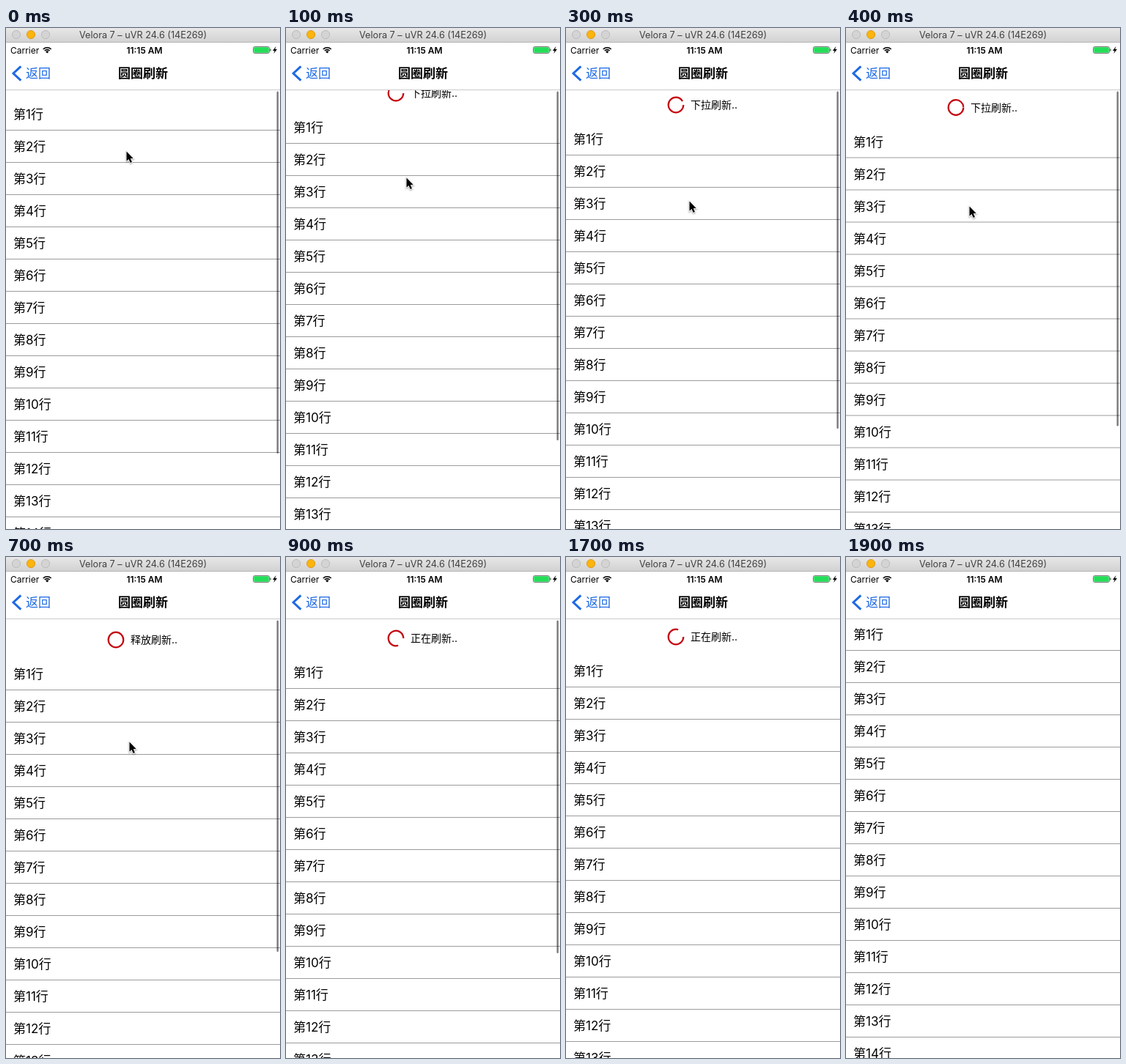
An HTML page with a canvas that plays this animation: 374x684 px, repeating every 2 s.

```html
<!DOCTYPE html>
<html lang="zh-CN">
<head>
<meta charset="utf-8">
<title>圆圈刷新</title>
<style>
  html, body { margin: 0; width: 100%; height: 100%; overflow: hidden; background: #fff; }
  canvas { display: block; }
</style>
</head>
<body>
<canvas width="374" height="684"></canvas>
<script>
const ctx = document.querySelector('canvas').getContext('2d');
const WIDTH = 374, HEIGHT = 684, LOOP = 2000, STEP = 100;
const ROW = 44, FULL_PULL = 50;
const FONT = 'Inter, "Noto Sans CJK SC", "Noto Sans CJK", sans-serif';

// Pull distance per step while dragging and settling; it then rests at FULL_PULL.
const DRAG = [12, 30, 40.5, 46, 49.5, 52, 53.5, 54, 54, 52];
const REFRESH_STEP = 9, CLOSE_STEP = 18;

function text(str, x, y, size, color = '#000', weight = 400, align = 'left') {
  ctx.font = `${weight} ${size}px ${FONT}`;
  ctx.fillStyle = color;
  ctx.textAlign = align;
  ctx.fillText(str, x, y);
}

function rect(x, y, w, h, color) {
  ctx.fillStyle = color;
  ctx.fillRect(x, y, w, h);
}

function roundRect(x, y, w, h, r) {
  ctx.beginPath();
  ctx.roundRect(x, y, w, h, r);
}

function polyline(points) {
  ctx.beginPath();
  points.forEach(([x, y]) => ctx.lineTo(x, y));
}

function stroke(color, width) {
  ctx.strokeStyle = color;
  ctx.lineWidth = width;
  ctx.stroke();
}

function fill(color) {
  ctx.fillStyle = color;
  ctx.fill();
}

function arc(x, y, r, from, to) {
  ctx.beginPath();
  ctx.arc(x, y, r, from, to);
}

function drawRows(pull) {
  for (let i = 0; i < 14; i++) {
    const top = 84 + pull + i * ROW;
    text(`第${i + 1}行`, 10, top + 28, 17);
    rect(0, top + 43, WIDTH, 1, '#9b9b9b');
  }
}

function drawRefreshHeader(pull, step) {
  const y = 59 + pull;
  const refreshing = step >= REFRESH_STEP;
  const turn = refreshing ? (step * STEP - 1700) / 1000 * 2 * Math.PI : 0;
  const part = refreshing ? 0.8 : Math.min(1, pull / FULL_PULL);
  arc(150, y, 10.3, turn, turn + part * 2 * Math.PI);
  stroke('#c4000c', 2.2);
  const label = refreshing ? '正在' : pull >= FULL_PULL ? '释放' : '下拉';
  text(label + '刷新..', 170, y + 5, 14);
}

function drawScrollbar(pull, step) {
  const alpha = 0.5 * Math.max(0, Math.min(1, (12 - step) / 3));
  roundRect(369.5, 86.5, 2.5, 506.5 - pull, 1.25);
  fill(`rgba(0,0,0,${alpha})`);
}

function drawWifi(x, y) {
  const from = -Math.PI * 0.75, to = -Math.PI * 0.25;
  for (const r of [7.7, 4.9]) {
    arc(x, y, r, from, to);
    stroke('#000', 1.6);
  }
  ctx.beginPath();
  ctx.moveTo(x, y);
  ctx.arc(x, y, 3, from, to);
  fill('#000');
}

function drawWindowBar() {
  const shade = ctx.createLinearGradient(0, 0, 0, 19);
  shade.addColorStop(0, '#e7e7e7');
  shade.addColorStop(1, '#d2d2d2');
  rect(0, 0, WIDTH, 19, shade);
  rect(0, 19, WIDTH, 1, '#b5b5b5');
  [['#d4d4d4', '#bcbcbc'], ['#fdb40d', '#dc9b1c'], ['#d4d4d4', '#bcbcbc']].forEach(([body, edge], i) => {
    arc(14 + 20 * i, 9, 5.6, 0, 2 * Math.PI);
    fill(body);
    stroke(edge, 1);
  });
  text('Velora 7 – uVR 24.6 (14E269)', 187, 14, 12.7, '#404040', 400, 'center');
}

function drawStatusBar() {
  text('Carrier', 6, 34.5, 12);
  drawWifi(56.2, 34.5);
  text('11:15 AM', 189, 34.5, 12, '#000', 600, 'center');
  roundRect(337.5, 25.5, 22, 9, 2);
  stroke('#555', 0.8);
  roundRect(338.3, 26.3, 20.4, 7.4, 1);
  fill('#22dd58');
  rect(360.4, 28.5, 1.3, 3, '#555');
  polyline([[368.5, 25], [364, 31], [366.6, 31], [365.4, 35], [370, 29], [367.3, 29]]);
  fill('#000');
}

function drawNavBar() {
  rect(0, 20, WIDTH, 64, '#fff');
  rect(0, 84, WIDTH, 1, '#c9c9c9');
  drawStatusBar();
  polyline([[20.3, 52.3], [10, 62], [20.3, 71.7]]);
  stroke('#1d69e4', 3);
  text('返回', 27, 68, 17, '#1d69e4');
  text('圆圈刷新', 187, 68, 17, '#000', 600, 'center');
}

function drawCursor(pull, step) {
  ctx.save();
  ctx.translate(step < 3 ? 164.5 : 168.5, 144.5 + 2 * pull);
  polyline([[0, 0], [0, 13.2], [3, 10.5], [5.2, 15.5], [7.5, 14.5], [5.3, 9.7], [9.2, 9.4]]);
  ctx.closePath();
  ctx.shadowColor = 'rgba(0,0,0,.4)';
  ctx.shadowBlur = 2;
  ctx.shadowOffsetY = 1;
  stroke('#fff', 1.8);
  ctx.shadowColor = 'transparent';
  fill('#000');
  ctx.restore();
}

function draw(now) {
  const step = Math.floor(now % LOOP / STEP);
  const pull = step >= CLOSE_STEP ? 0 : DRAG[step] ?? FULL_PULL;
  rect(0, 0, WIDTH, HEIGHT, '#fff');
  drawRefreshHeader(pull, step);
  drawRows(pull);
  drawScrollbar(pull, step);
  drawNavBar();
  drawWindowBar();
  if (step < REFRESH_STEP) drawCursor(pull, step);
}

const start = performance.now();
function tick() {
  draw(performance.now() - start);
  requestAnimationFrame(tick);
}
tick();
</script>
</body>
</html>
```
